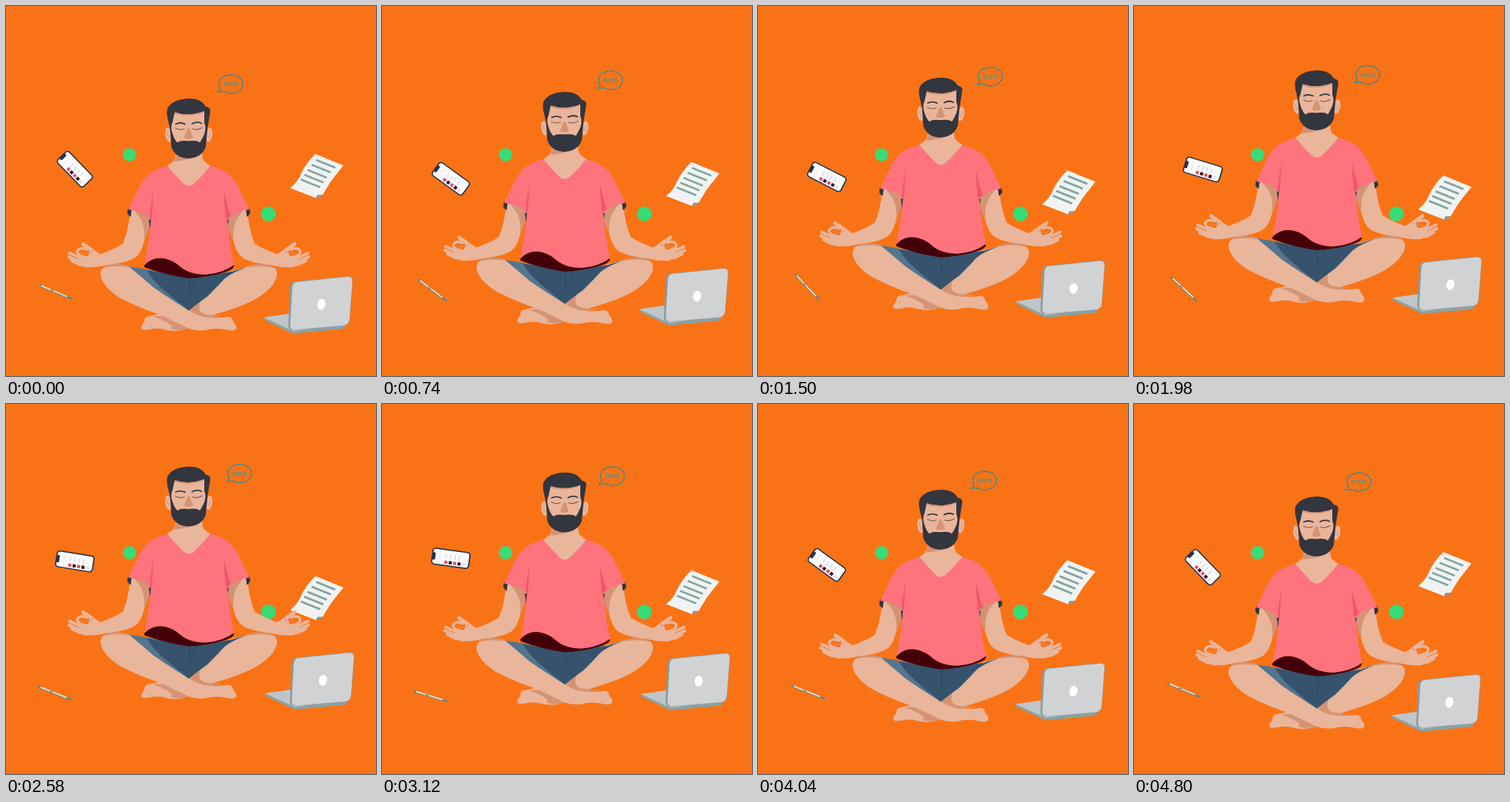
An HTML page with a canvas that plays this animation: 500 by 500 pixels, repeating every 4820 ms.

```html
<!DOCTYPE html>
<html lang="en">
<head>
<meta charset="utf-8">
<title>Meditation</title>
<style>
html, body { margin: 0; width: 100%; height: 100%; overflow: hidden; background: #f97316; }
canvas { display: block; width: 100vw; height: 100vh; }
</style>
</head>
<body>
<canvas id="stage" width="500" height="500"></canvas>
<script>
const ctx = document.getElementById('stage').getContext('2d');
const LOOP = 4820, CYCLE = 4800;
const C = {
  bg: '#f97316', skin: '#e9b59b', shade: '#d39374', hair: '#33353f', shirt: '#ff737d',
  fold: '#f2566a', lining: '#440008', shorts: '#36526d', shortsLight: '#54758e',
  green: '#38dc76', teal: '#4a9a9a', ink: '#84a5a3'
};

const fill = (d, color) => { ctx.fillStyle = color; ctx.fill(new Path2D(d)); };
const line = (d, color, width) => {
  ctx.strokeStyle = color;
  ctx.lineWidth = width;
  ctx.stroke(new Path2D(d));
};
const ellipse = (x, y, rx, ry, color, angle = 0) => {
  ctx.fillStyle = color;
  ctx.beginPath();
  ctx.ellipse(x, y, rx, ry, angle, 0, Math.PI * 2);
  ctx.fill();
};
const box = (x, y, w, h, r, color) => {
  ctx.fillStyle = color;
  ctx.beginPath();
  ctx.roundRect(x, y, w, h, r);
  ctx.fill();
};
function at(x, y, degrees, draw) {
  ctx.save();
  ctx.translate(x, y);
  ctx.rotate(degrees * Math.PI / 180);
  draw();
  ctx.restore();
}
// Draws a part, then its reflection about the body's axis.
function both(draw) {
  draw();
  ctx.save();
  ctx.translate(494, 0);
  ctx.scale(-1, 1);
  draw();
  ctx.restore();
}

// Smooth periodic interpolation through [time, ...values] keys.
function track(t, keys) {
  const n = keys.length;
  const key = i => {
    const wraps = Math.floor(i / n), k = keys[i - wraps * n];
    return [k[0] + wraps * CYCLE, ...k.slice(1)];
  };
  let i = n - 1;
  while (keys[i][0] > t) i--;
  const [a, b, c, d] = [key(i - 1), key(i), key(i + 1), key(i + 2)];
  const h = c[0] - b[0], u = (t - b[0]) / h;
  return b.slice(1).map((v, j) => {
    const k = j + 1;
    const m0 = (c[k] - a[k]) / (c[0] - a[0]) * h;
    const m1 = (d[k] - b[k]) / (d[0] - b[0]) * h;
    return v + u * m0 + u * u * (3 * (c[k] - v) - 2 * m0 - m1)
      + u * u * u * (2 * (v - c[k]) + m0 + m1);
  });
}

const PHONE = [[0, 220.5, 46], [740, 233.5, 36], [1500, 231, 27], [1980, 221, 17],
  [3120, 208.5, 8], [4040, 217.5, 36]];
const PEN = [[0, 67, 386.5, 23], [740, 68, 384, 37], [1500, 66.5, 380, 47],
  [1980, 67.5, 382.5, 43], [2600, 66, 391, 21], [3120, 66, 395, 17], [4040, 68, 389.5, 21.6]];
const BUBBLE = [[0, 0, 0], [740, 5, -5], [1500, 10, -10], [1980, 12, -12.5],
  [2300, 13, -13.3], [2720, 11, -10.5], [3120, 7.5, -8], [4040, 2.2, -2]];
const LAPTOP = [[0, 0, -0.8], [740, -0.5, -11.8], [1500, 0.3, -22.3], [2180, 1.8, -28.8],
  [2700, 2.2, -30.8], [3120, 1.8, -29.6], [3780, 0.5, -21.3], [4320, 0, -9.8]];

function drawPhone() {
  box(-26, -11.5, 52, 23, 4.5, '#24304a');
  box(-24.3, -10, 48.6, 20, 3.2, '#fbfbfc');
  box(-25, -5, 4, 10, 1.5, '#24304a');
  for (let i = 0; i < 5; i++) {
    const x = -8 + i * 6;
    box(x, 4, 4.2, 4.2, 0.4, ['#e0506a', '#3a1018', '#e0506a', '#3a1018', '#eadfe2'][i]);
    if (i < 4) line(`M${x + 1} -5 q2 3 0 7`, '#b9b4c0', 0.7);
  }
  line('M-15 -6 V5', '#dcdce2', 0.8);
}

function drawPen() {
  line('M-24 0 H23', '#4f8a86', 2.6);
  line('M-21 -.3 H17', '#eef2ee', 1.5);
  line('M-7 0 H-3 M17 0 H25', '#6d8a88', 1.4);
}

function drawBubble() {
  const shape = 'M290 111.5 C284 103 291 93 304 93 C313 93 320 98 320 105 C320 113 313 118 304 118 '
    + 'C300 118 298 117 296 115.5 L286 116 Q289 114 290 111.5 Z';
  line(shape, C.teal, 1.4);
  ctx.setLineDash([1.5, 2.5]);
  line(shape, '#4b5f5c', 1.2);
  ctx.setLineDash([]);
  for (const x of [297, 304, 311]) {
    ctx.beginPath();
    ctx.arc(x, 105.5, 2.2, 0, Math.PI * 2);
    ctx.strokeStyle = C.teal;
    ctx.lineWidth = 1.2;
    ctx.stroke();
  }
}

function drawPaper() {
  fill('M418 200 L456 215.5 Q446 228 439 237 Q434 245 428 255 L419 259.5 L384 246 '
    + 'Q395 237 399 226 Q405 213 418 200 Z', '#f1f3f2');
  fill('M418.5 259.5 L421 255 L428 255 Q424 260 418.5 259.5 Z', '#8d9c98');
  for (const [x, y] of [[419, 208], [413, 214.5], [407.5, 221.5], [403, 228], [398.5, 234.5]])
    line(`M${x} ${y} l26 10.5`, C.ink, 2.8);
}

function drawLaptop() {
  fill('M348 422 L386 416 L460 431 L456 437 L388 443.5 L348 424.5 Z', '#8aa2a5');
  fill('M348 421.5 L386 416 L450 431 L388 440 Z', '#c0c6c8');
  fill('M391 373 L461 366 Q468.5 365.5 468.5 372 L464.5 425 Q463 432 456 433 L388 438.5 '
    + 'Q381 439 381.5 431 L384 380 Q385 374 391 373 Z', '#8b999d');
  fill('M393 373.8 L461 366.8 Q468 366.3 468 372 L464 425 Q463 431.5 456 432.5 L390 438 '
    + 'Q383.5 438 384 431 L387 380 Q388 374.3 393 373.8 Z', '#d0d2d4');
  ellipse(426.2, 404, 5.5, 7.3, '#fff', 0.2);
}

function drawLegs() {
  // Far shin and its foot
  fill('M190 420 Q187 421 187 427 Q182 432 183 436 Q185 439 194 437 Q206 434 217 438 '
    + 'Q232 441 246 436 L262 424 L225 412 Z', C.skin);
  fill('M198 419 L222 419 L246 432 L246 436 Q236 440 222 436 Q232 432 198 419 Z', C.shade);
  fill('M247 411 L266 398 L300 400 L278 417 Q290 420 303 417 L262 424 Z', C.shade);
  fill('M324 353 Q345 348 358 351 Q368 355 366 365 Q362 381 339 395 Q318 407 278 418 '
    + 'Q264 418 261.5 411 L255 400 L290 362 Z', C.skin);
  fill('M246 412 L264 396 Q259 408 263 413 Q267 418 280 418 Q260 424 246 412 Z', C.shade);
  // Near shin and its foot
  fill('M170 353 Q149 348 136 351 Q126 355 128 365 Q132 381 155 395 Q180 408 210 418 '
    + 'Q229 427 243 434 Q256 440 270 438 Q284 434 300 438 Q309 440 311 436 Q312 431 307 427 '
    + 'Q307 421 301 420 Q288 422 274 421 Q260 420 247 411 L247 395 L210 370 Z', C.skin);
  both(() => fill('M131 354 Q135 350 145 349 Q158 348 172 353 L166 353 Q147 350 131 354 Z', C.shade));
  fill('M166 352 L190 356 L247 367 L305 359 L328 352 Q306 360 296 368 Q283 382 272 393 '
    + 'Q258 402 247 411.5 Q216 392 199 380 Q183 366 166 352 Z', C.shortsLight);
  fill('M190 357 L247 367 L306 359 L322 354 Q303 361 293 370 Q279 386 268 395 '
    + 'L247 411.5 Q217 388 204 375 Q198 369 193 361 Z', C.shorts);
  line('M248 368 V393 M257 367 Q257 378 249 384', '#24445c', 0.8);
}

function drawArm() {
  fill('M168 275 Q166 302 158 321 Q148 328 126 336 L111 338 L94 344 L106 353 '
    + 'Q120 354 136 350 Q158 348 171 342 Q180 338 184 326 Q191 308 195 289 L180 270 Z', C.skin);
  fill('M170 272 L196 280 L196 289 Q193 304 186 319 Q190 296 177 281 Z', C.shade);
  fill('M165 273 L163.8 280 Q166 284 168.5 285 L170 274 Z M193 289 L197 288 L197 299 L194.5 300 Z', C.hair);
  // Hand: fingers first, then the ring of thumb and index finger
  line('M86 334 L97 339 L109 345', C.skin, 4);
  line('M85 339 L96 344 L109 347', C.skin, 4.2);
  line('M89 344 L99 349 L112 350', C.skin, 4.5);
  line('M104 321.5 L116 330 L124 336', C.skin, 4.6);
  line('M105 323 Q114 327 123 337', C.skin, 4.6);
  line('M109 329 Q99 325 96 332 Q97 338 110 340', C.skin, 3.4);
  fill('M112 331 L120 332 L130 336 L131 350 L103 352 L98 342 Q114 341 112 331 Z', C.skin);
  line('M103 334 Q112 336 118 330', C.shade, 1);
}

function drawTorso() {
  fill('M187 350 Q200 335 225 344 L308 350 Q309 355 298 359 Q272 367 247 368 '
    + 'Q213 363 187 353 Z', C.lining);
  fill('M218 216 Q199 221 190 230 Q181 240 175 255 L165 275 Q182 277 196 287 '
    + 'Q194 317 187 350 Q199 338 214 341 Q226 344 234 351 Q247 363 270 363 '
    + 'Q293 361 308 350 Q302 323 299 287 Q312 277 329 275 L319 255 Q313 240 304 230 '
    + 'Q295 221 276 216 L247 228 Z', C.shirt);
  both(() => fill('M199 250 Q196 267 194 286 L196.5 289 Q199 270 199 250 Z', C.fold));
  fill('M295 252 Q294 268 299 287 L304 284 Q299 271 295 252 Z', C.fold);
  fill('M229 198 Q229 207 226 210 L218 216 Q229 229 240 240 Q247 246 254 240 '
    + 'Q266 229 276 216 L268 210 Q265 207 265 198 Z', C.skin);
  fill('M229 198 L265 198 Q254 208 227 210 Q229 206 229 198 Z', C.shade);
}

function drawHead() {
  both(() => {
    ellipse(219.6, 174, 4.3, 9.8, C.skin, -0.15);
    line('M218.5 170 Q217 174 220.5 178', C.shade, 0.8);
  });
  fill('M218 150 Q217 143 218 139 Q224 126 247 125 Q264 125 270 136 Q277 137 276 143 '
    + 'L272.5 164 L270 190 Q265 205 246 206 Q229 205 223.5 191 L221.5 165 Z', C.hair);
  fill('M228 143.5 Q247 150 268 142 L268 158 Q271 165 268 173 Q265 180 262 184.5 '
    + 'Q258 181 246.5 182.5 Q236 181 231.5 184.5 Q227 180 224.5 171 Q222 163 225 157 Z', C.skin);
  fill('M228 143.5 Q247 150 268 142 L268 143.5 Q247 151.5 228 145.5 Z', C.shade);
  fill('M245.5 165 L240.5 178 Q247 181 252.5 178 L248.5 166 Z', C.shade);
  line('M229.5 159.5 Q235 156.5 242 159.5 M251.5 159 Q258 155.5 264 158.5', C.hair, 1.8);
  line('M229 165 Q235 168.5 241 166 M252 166 Q258 168.5 265 164.5', '#76584f', 1.1);
}

function draw(t) {
  const swing = (1 - Math.cos(2 * Math.PI * t / CYCLE)) / 2;
  const ramp = 1 - Math.abs(1 - 2 * t / CYCLE);
  ctx.fillStyle = C.bg;
  ctx.fillRect(0, 0, 500, 500);
  ctx.lineJoin = 'round';

  ellipse(167, 201, 9, 9, C.green);
  ellipse(354.5, 281, 10, 10, C.green);

  ctx.lineCap = 'butt';
  const [phoneY, phoneTurn] = track(t, PHONE);
  at(93, phoneY, phoneTurn, drawPhone);
  at(...track(t, PEN), drawPen);
  at(...track(t, BUBBLE), 0, drawBubble);
  at(0, 35 * ramp, 0, () => {
    ctx.translate(0, -5 + 5);
    drawPaper();
  });
  at(...track(t, LAPTOP), 0, drawLaptop);

  ctx.lineCap = 'round';
  at(0, -41 * swing, 0, () => {
    drawLegs();
    both(drawArm);
    drawTorso();
    drawHead();
  });
}

function frame(now) {
  const t = Math.floor(now % LOOP / 20) * 20;
  draw(Math.min(t, CYCLE - 0.001));
  requestAnimationFrame(frame);
}
draw(0);
requestAnimationFrame(frame);
</script>
</body>
</html>
```
